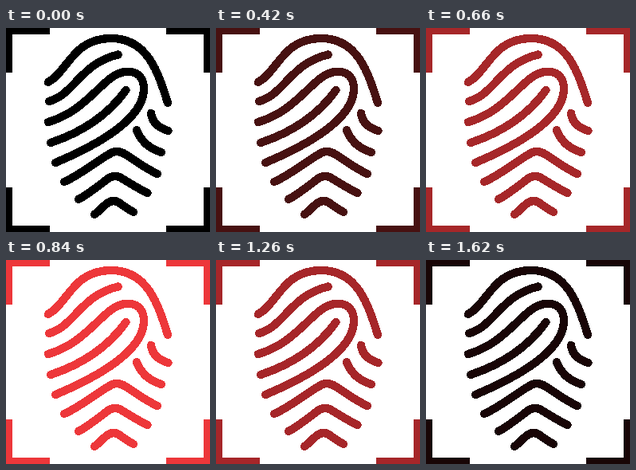
Recreate the animation shown at these times as an HTML page. Size 256x256 px, loop 1.68 s.

```html
<!DOCTYPE html>
<html lang="en">
<head>
<meta charset="utf-8">
<title>Fingerprint scan</title>
<style>
  html, body {
    margin: 0;
    width: 100%;
    height: 100%;
    overflow: hidden;
    background: #fff;
  }
  svg {
    display: block;
    width: 100%;
    height: 100%;
    color: #000;
    shape-rendering: crispEdges;
    animation: pulse 1680ms infinite;
  }
  .corners { fill: currentColor; }
  .ridges {
    fill: none;
    stroke: currentColor;
    stroke-width: 10.3;
    stroke-linecap: round;
    stroke-linejoin: round;
  }
  /* Black hold, ten steps up to red, hold, nine steps back down */
  @keyframes pulse {
    0% { color: #000; animation-timing-function: step-end; }
    17.857% { color: #000; animation-timing-function: steps(10, start); }
    53.571% { color: rgb(237, 55, 58); animation-timing-function: step-end; }
    67.857% { color: rgb(237, 55, 58); animation-timing-function: steps(9, start); }
    100% { color: rgb(24, 5, 6); }
  }
</style>
</head>
<body>
<svg viewBox="0 0 256 256" role="img" aria-label="Fingerprint in a scan frame">
  <g class="corners">
    <path d="M0 0H55V8H8V56H0Z"/>
    <path d="M256 0H201V8H248V56H256Z"/>
    <path d="M0 256H55V248H8V200H0Z"/>
    <path d="M256 256H201V248H248V200H256Z"/>
  </g>
  <g class="ridges">
    <path d="M53 68C78 54 84 13 132 13C178 13 191 56 203 94"/>
    <path d="M54 92C85 84 94 44 140.500 33.500"/>
    <path d="M53 118C91 107 111 79 130 64C149 49 173 52 173 76C173 115 112 148 62 169"/>
    <path d="M56 144C92 132 126 112 150.500 78"/>
    <path d="M182 107Q184 123 203.500 129"/>
    <path d="M164 128Q172 149 195 156"/>
    <path d="M73 193C94 184 112 168 130 158Q139 152 149 158C163 167 178 178 190 183"/>
    <path d="M91 215C104 208 116 198 128 189Q137 183 146 189C157 196 167 202 177.500 207"/>
    <path d="M111 234C118 229 121 224 127 220Q135 214 143 220C149 224 154 228 160 231"/>
  </g>
</svg>
</body>
</html>
```
